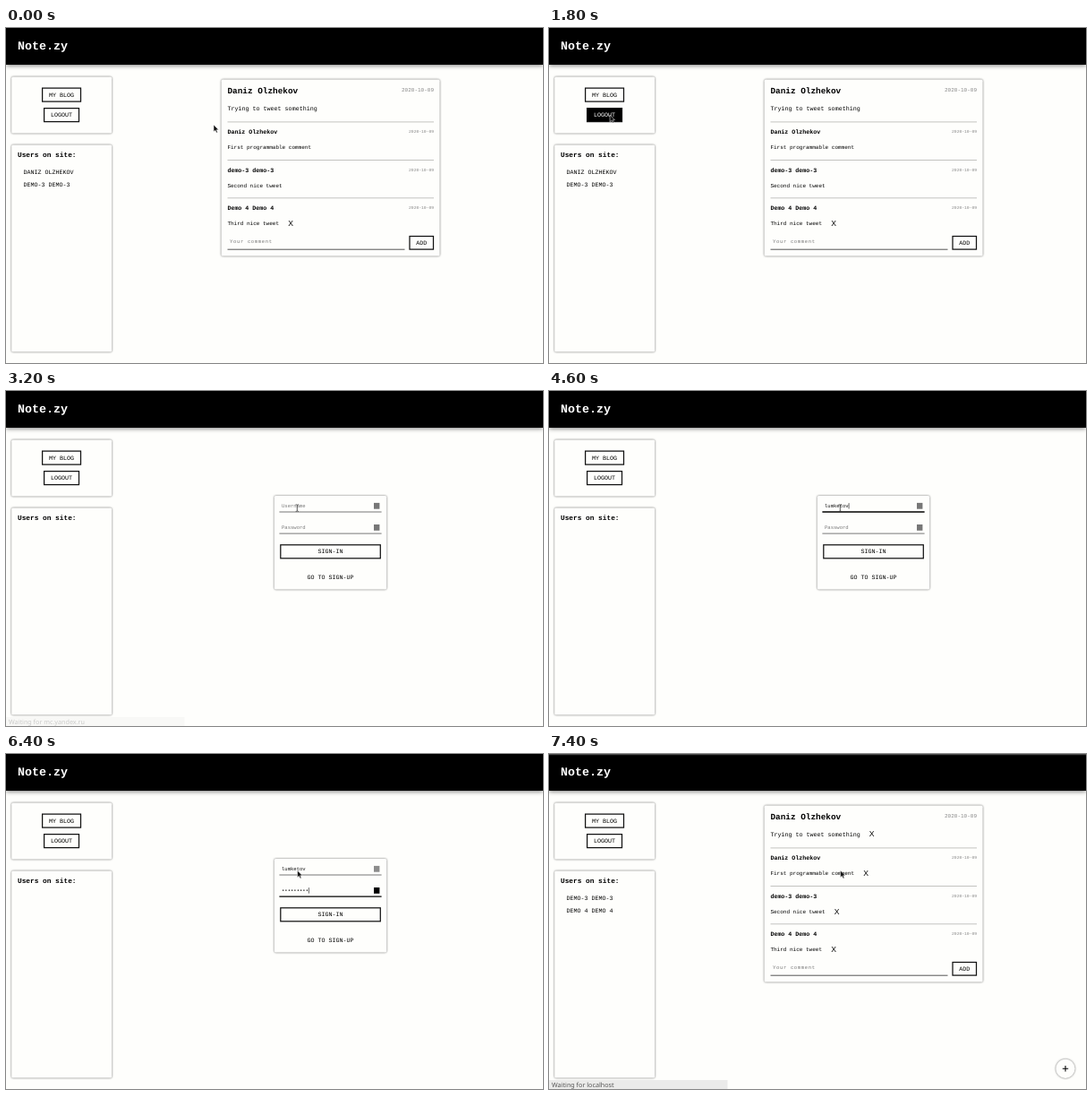
These frames come from a looping animation (600x374 px, 8 s). An HTML page:

```html
<!DOCTYPE html>
<html lang="en">
<head>
<meta charset="utf-8">
<title>Blog login</title>
<style>
  html, body { margin: 0; width: 100%; height: 100%; overflow: hidden; background: #fefefc; }
  svg { display: block; width: 600px; height: 374px; }
  text { font-family: "Liberation Mono", monospace; text-rendering: geometricPrecision; white-space: pre; }
  .b { font-weight: bold; }
  .x { font-family: "Liberation Sans", sans-serif; }
  .status text { font-family: "Noto Sans", sans-serif; }
  .card { fill: #fefefc; filter: drop-shadow(0 0 1.3px rgba(0, 0, 0, .6)); }
  .header { filter: drop-shadow(0 1px 2.5px rgba(0, 0, 0, .5)); }
  .btn { fill: #fefefc; stroke: #111; stroke-width: 1.25; }
</style>
</head>
<body>
<svg id="stage" viewBox="0 0 600 374"></svg>
<script>
const LOOP = 8000, STEP = 200;
const USER = "lumketov";
const AUTHOR = "Daniz Olzhekov", SECOND = "demo-3 demo-3", THIRD = "Demo 4 Demo 4";
const DATE = "2020-10-09";
const CHAR = 3.334; // advance of one typed character

const text = (x, y, size, str, { fill = "#000", cls = "", anchor = "start", id = "" } = {}) =>
  `<text x="${x}" y="${y}" font-size="${size}" fill="${fill}" class="${cls}" text-anchor="${anchor}" id="${id}">${str}</text>`;
const bold = (x, y, size, str, fill) => text(x, y, size, str, { cls: "b", fill });
const rect = (x, y, w, h, attrs = "") => `<rect x="${x}" y="${y}" width="${w}" height="${h}" ${attrs}/>`;
const card = (x, y, w, h) => rect(x, y, w, h, 'rx="1.6" class="card"');
const line = (x1, x2, y, color, width = 1, id = "") =>
  `<path id="${id}" d="M${x1} ${y}H${x2}" stroke="${color}" stroke-width="${width}"/>`;
const button = (x, y, w, h, label, id) =>
  `<g id="${id}">${rect(x, y, w, h, 'class="btn"')}${text(x + w / 2, y + h / 2 + 2, 6.67, label, { anchor: "middle" })}</g>`;
const cross = (x, y) => text(x, y + 3, 8.6, "X", { cls: "x", anchor: "middle" });
const date = (y, size) => text(478, y, size, DATE, { fill: "#888", anchor: "end" });
const group = (id, ...parts) => `<g id="${id}">${parts.join("")}</g>`;

const comment = (y, name, body) =>
  line(247.5, 478, y, "#b4b4b2", .8) + bold(247.4, y + 13.1, 6.67, name) +
  date(y + 12, 4.67) + text(247.4, y + 30.2, 6, body);

const status = (id, label) => `<g id="${id}" class="status">` +
  rect(0, 364, 199.5, 10, 'fill="#ebebea"') + text(3, 371.8, 7.2, label, { fill: "#555" }) + "</g>";

const field = (id, label, y) =>
  text(308, y, 5.556, label, { id: id + "Text" }) +
  line(305.4, 419.6, y + 5.1, "#777", 1, id + "Line") +
  rect(411, y - 5, 6.4, 6.8, `id="${id}Icon" fill="#777"`);

const stage = document.getElementById("stage");
stage.innerHTML = [
  rect(0, 0, 600, 41, 'class="header"'),
  bold(13, 24.2, 13.33, "Note.zy", "#fff"),
  card(6.2, 54.6, 112, 63), card(6.2, 130.4, 112, 231.2),
  button(40.6, 67.1, 42.9, 15, "MY BLOG", "blog"),
  button(42.6, 89.6, 38.9, 15, "LOGOUT", "logout"),
  bold(13, 144.1, 7.8, "Users on site:"),
  group("feed",
    text(19.5, 163, 6.67, "", { id: "userA" }),
    text(19.5, 177.3, 6.67, "", { id: "userB" }),
    card(240.6, 57.6, 244, 197),
    bold(247.4, 72.9, 9.4, AUTHOR), date(71.4, 6),
    text(247.4, 92, 6.7, "Trying to tweet something"),
    comment(104.9, AUTHOR, "First programmable comment"),
    comment(147.5, SECOND, "Second nice tweet"),
    comment(189.8, THIRD, "Third nice tweet"),
    cross(318, 218),
    text(250, 240.4, 5.556, "Your comment", { fill: "#777" }).replace("<text", '<text letter-spacing=".65"'),
    line(247.5, 445.5, 247.2, "#555"),
    button(451, 232.5, 26.5, 14.6, "ADD", "add")),
  group("owner",
    cross(360.5, 89), cross(354, 132.8), cross(321.5, 175.5),
    '<circle cx="577" cy="351.3" r="10.6" class="card"/>',
    '<path d="M573.8 351.3h6.4M577 348.1v6.4" stroke="#000" stroke-width="1.1"/>'),
  group("login",
    card(299.8, 117, 125.4, 104.4),
    field("name", "Username", 129.9),
    field("pass", "Password", 154),
    '<path id="caret" stroke="#000" stroke-width=".6"/>',
    button(306.8, 171.8, 111.5, 15, "SIGN-IN", "signin"),
    text(362.5, 210, 6.67, "GO TO SIGN-UP", { anchor: "middle" })),
  rect(0, 0, 600, 1.2, 'id="strip" fill="#484848"'),
  status("remote", "Waiting for mc.yandex.ru"),
  status("local", "Waiting for localhost"),
  group("pointer",
    '<path id="arrow" d="M0 0V7.8L1.8 6.2L3.1 9L4.4 8.4L3.2 5.7H5.5Z" fill="#111" stroke="#fff" stroke-width=".5"/>',
    '<path id="hand" d="M-.9-1.6q.8-.9 1.5 0V2l3.6 .8q.8 .3 .7 1.3L4.2 7.6H-.2L-3 4.2q-.2-1.2 1-.7l1.1 .9Z" fill="#fff" stroke="#222" stroke-width=".6"/>',
    '<path id="beam" d="M-1.6-3.4q1.3 0 1.6.6q.3-.6 1.6-.6M0-2.8V3.6M-1.6 4.2q1.3 0 1.6-.6q.3.6 1.6.6" fill="none" stroke="#333" stroke-width=".8"/>')
].join("");

const el = {};
stage.querySelectorAll("[id]").forEach(node => { if (node.id) el[node.id] = node; });
const show = (id, on, opacity = 1) => {
  el[id].style.display = on ? "" : "none";
  el[id].style.opacity = opacity;
};

// [time, x, y, shape]
const moves = [
  [0, 232, 108, "arrow"], [600, 222, 107, "arrow"], [800, 154, 104, "arrow"],
  [1000, 84, 100, "arrow"], [1200, 68.8, 98.2, "hand"], [1800, 68, 97, "arrow"],
  [2200, 165.2, 103, "arrow"], [2600, 205, 110, "arrow"], [2800, 282, 124, "arrow"],
  [3000, 325.3, 130.2, "beam"], [6400, 325.6, 130, "arrow"]
];

const count = (t, start, end, first, total) =>
  t < start ? 0 : Math.min(total, Math.round(first + (total - first) * (t - start) / (end - start)));

function setField(id, value, label, focused) {
  el[id + "Text"].textContent = value || label;
  el[id + "Text"].setAttribute("fill", value ? "#111" : "#777");
  el[id + "Line"].setAttribute("stroke", focused ? "#000" : "#777");
  el[id + "Line"].setAttribute("stroke-width", focused ? 1.3 : 1);
}

function draw(t) {
  const signedIn = t >= 7000, login = t >= 2200 && !signedIn;
  show("feed", !login);
  show("owner", signedIn);
  show("login", login);
  el.userA.textContent = (signedIn ? SECOND : AUTHOR).toUpperCase();
  el.userB.textContent = (signedIn ? THIRD : SECOND).toUpperCase();

  const hover = t < 1200 || login || signedIn ? 0 : t < 1400 ? 1 : 2;
  el.logout.firstChild.style.fill = ["#fefefc", "#4c4c4c", "#000"][hover];
  el.logout.lastChild.style.fill = ["#000", "#8c8c8c", "#fff"][hover];

  const typed = count(t, 3800, 4600, 1, USER.length);
  const dots = count(t, 5000, 6000, 2, 9);
  const onName = t >= 3800 && t < 4800, onPass = t >= 4800;
  setField("name", USER.slice(0, typed), "Username", onName);
  setField("pass", "•".repeat(dots), "Password", onPass);
  show("nameIcon", t >= 3000);
  show("passIcon", t >= 3000);
  el.nameIcon.setAttribute("fill", onPass ? "#8c8c8c" : "#777");
  el.passIcon.setAttribute("fill", onPass ? "#000" : "#777");
  show("caret", onName || onPass);
  const caretX = 308.4 + CHAR * (onPass ? dots : typed);
  el.caret.setAttribute("d", `M${caretX} ${onPass ? 149.2 : 125.1}v6.4`);

  show("strip", (t >= 2600 && t < 3000) || t >= 7400);
  show("remote", t >= 2600 && t < 3400, t < 3000 ? 1 : t < 3200 ? .65 : .3);
  show("local", t >= 7400);

  const [, x, y, shape] = moves.filter(m => m[0] <= t).pop();
  el.pointer.setAttribute("transform", `translate(${x} ${y})`);
  for (const s of ["arrow", "hand", "beam"]) show(s, s === shape);
}

const start = performance.now();
function tick() {
  const t = (performance.now() - start) % LOOP;
  draw(Math.floor(t / STEP) * STEP);
  requestAnimationFrame(tick);
}
tick();
</script>
</body>
</html>
```
